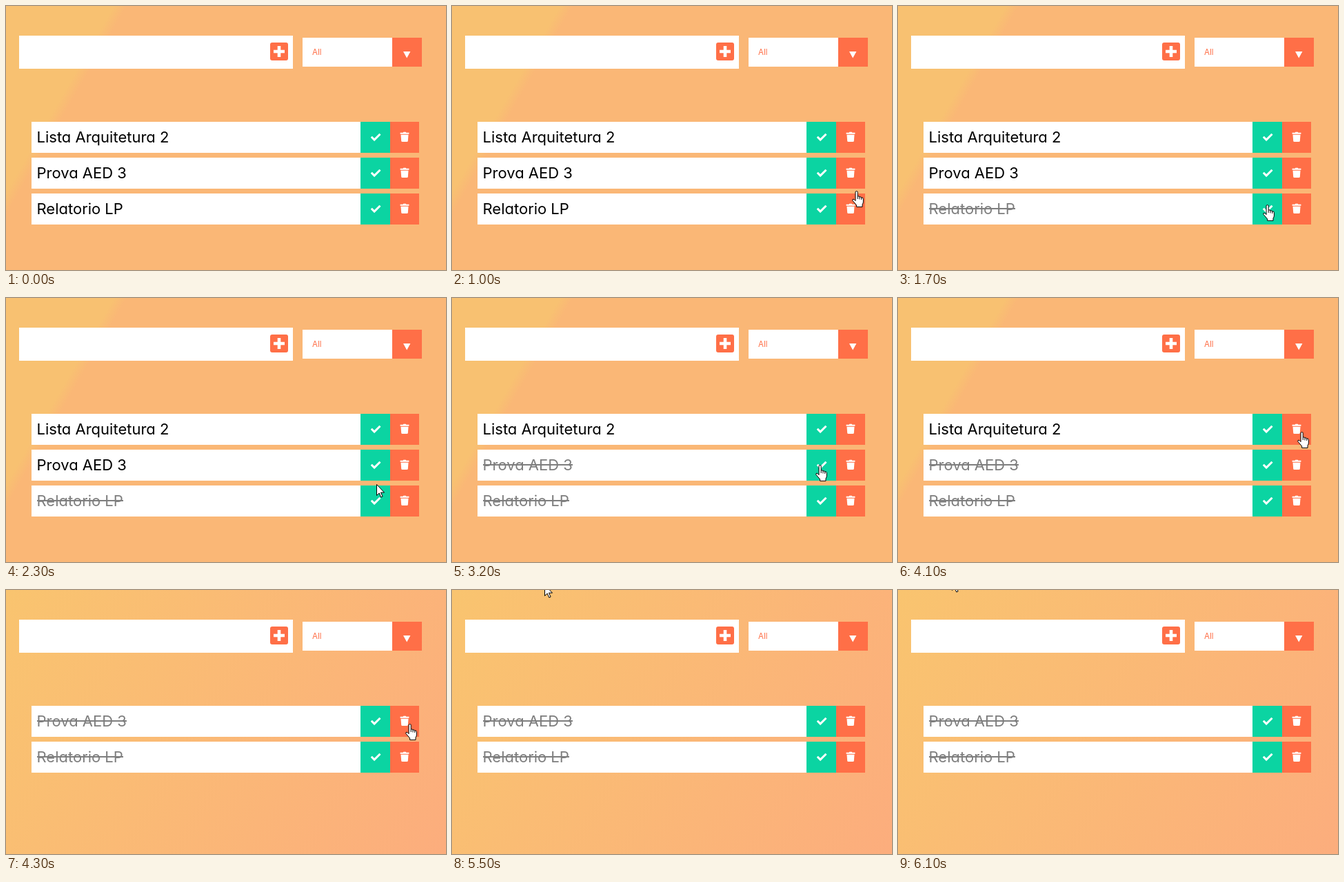
An HTML page for the animation above (6200 ms loop, 638 by 383 pixels).

```html
<!DOCTYPE html>
<html lang="pt">
<head>
<meta charset="utf-8">
<title>Lista de tarefas</title>
<style>
  html, body { margin: 0; width: 100%; height: 100%; overflow: hidden; }
  #stage {
    position: relative; width: 638px; height: 383px; overflow: hidden;
    background: linear-gradient(120deg, #f8c171 18.2%, #fab776 20.4%);
    font-family: Inter, Roboto, sans-serif;
    font-feature-settings: "cv11";
  }
  #stage.smooth { background: linear-gradient(120deg, #f9c46f, #fcad7d); }
  svg { position: absolute; left: 0; top: 0; }
  .input, .select, .row { position: absolute; background: #fff; }
  .input { left: 19px; top: 43px; width: 397px; height: 48px; }
  .select {
    left: 430px; top: 46px; width: 159px; height: 42px; padding-left: 14px;
    font-size: 11.5px; line-height: 42px; color: #ff6f47;
  }
  .row {
    left: 37px; width: 554.5px; height: 45px; padding-left: 7.5px;
    font-size: 22px; line-height: 44px; color: #000; white-space: nowrap;
  }
  .row span { position: relative; display: inline-block; }
  .done span { opacity: .5; }
  .done span::after {
    content: ""; position: absolute; left: 0; right: 0; top: 21px;
    height: 2px; background: #000;
  }
</style>
</head>
<body>
<div id="stage">
  <div class="input"></div>
  <div class="select">All</div>
  <svg width="638" height="383">
    <rect x="383" y="53" width="26" height="26" rx="3" fill="#ff6f47"/>
    <path d="M388 66h16M396 58v16" stroke="#fff" stroke-width="4.6"/>
    <path d="M560 46h43v42h-43z" fill="#ff6f47"/>
    <path d="M576 66h10.4l-5.2 9.4z" fill="#fff"/>
  </svg>
  <div class="row"><span>Lista Arquitetura 2</span></div>
  <div class="row"><span>Prova AED 3</span></div>
  <div class="row"><span>Relatorio LP</span></div>
  <svg width="638" height="383">
    <path id="cursor" fill="#fff" stroke="#000" stroke-linejoin="round"/>
  </svg>
</div>
<script>
const LOOP = 6200, STEP = 100;
const DELETED = 4300, DONE_AT = [Infinity, 3200, 1700];

const BUTTONS = `<svg style="left:477px" width="85" height="45">
  <path d="M0 0h43v45H0z" fill="#0bd4a2"/>
  <path d="M43 0h42v45H43z" fill="#ff6f47"/>
  <path d="M15.8 21.8l4.3 4.3 8.4-8.4" fill="none" stroke="#fff" stroke-width="3"/>
  <path d="M34.6 15.6h4l.8-1h3.2l.8 1h4v2h-12.8zM35.5 18.6h11l-.7 9q-.1 1.2-1.4 1.2h-6.8q-1.3 0-1.4-1.2z"
    transform="translate(0 .2)" fill="#fff"/>
</svg>`.replace('M34.6 15.6h4l.8-1h3.2l.8 1h4v2h-12.8zM35.5', 'M57.6 15.6h4l.8-1h3.2l.8 1h4v2h-12.8zM58.5');

const ARROW = 'M.5.5V16.5l3.7-3.5 2.6 6 2.3-1-2.6-5.8h5z';
const HAND = 'M5 14V2.2a1.6 1.6 0 0 1 3.2 0V8q2.6-.6 2.8 1 2.4-.6 2.8 1 2.6-.4 2.6 1.6V16' +
  'q0 2-1.4 4v3.4H6.6V21L1 14.4q-.8-2 1-2.2 1 0 3 2.4zM8.2 8v4M11 9v3.5M13.8 10v3';

// Pointer visits: [time, x, y, shape] of the shape's top left corner
const TRIPS = [
  { end: 4800, keys: [
    [900, 623, 238, ARROW], [1000, 580, 268, HAND], [1100, 552, 286, HAND],
    [1200, 536, 292, HAND], [1300, 529, 288, HAND], [2100, 529, 288, HAND],
    [2200, 530, 280, HAND], [2300, 537, 270, ARROW], [2400, 537, 270, ARROW],
    [2500, 531, 260, HAND], [3000, 527, 242, HAND], [3200, 527, 242, HAND],
    [3300, 552, 238, HAND], [3400, 580, 230, HAND], [3500, 607, 222, ARROW],
    [3600, 607, 222, ARROW], [3700, 609, 215, ARROW], [3900, 592, 200, HAND],
    [4100, 579, 194, HAND]] },
  { end: LOOP, keys: [
    [5500, 134, -8, ARROW], [5600, 94, -8, ARROW], [5700, 94, -8, ARROW],
    [5800, 86, -8, ARROW], [6000, 72, -11, ARROW], [6100, 78, -16, ARROW]] }
];

const stage = document.getElementById('stage');
const cursor = document.getElementById('cursor');
const rows = [...document.querySelectorAll('.row')];
rows.forEach(row => row.insertAdjacentHTML('beforeend', BUTTONS));

function drawCursor(t) {
  const trip = TRIPS.find(({ end, keys }) => t >= keys[0][0] && t < end);
  cursor.style.display = trip ? '' : 'none';
  if (!trip) return;
  const i = trip.keys.findLastIndex(key => key[0] <= t);
  const [t0, x0, y0, shape] = trip.keys[i];
  const [t1, x1, y1] = trip.keys[i + 1] || [t0 + 1, x0, y0];
  const k = (t - t0) / (t1 - t0);
  const x = Math.round(x0 + (x1 - x0) * k), y = Math.round(y0 + (y1 - y0) * k);
  cursor.setAttribute('d', shape);
  cursor.setAttribute('transform', `translate(${x} ${y})`);
}

function draw(now) {
  const t = Math.floor(now % LOOP / STEP) * STEP;
  const deleted = t >= DELETED;
  stage.classList.toggle('smooth', deleted);
  rows.forEach((row, i) => {
    row.classList.toggle('done', t >= DONE_AT[i]);
    row.style.top = 168 + 52 * (i - deleted) + 'px';
    row.style.display = deleted && i === 0 ? 'none' : '';
  });
  drawCursor(t);
}

const start = performance.now();
function tick() {
  draw(performance.now() - start);
  requestAnimationFrame(tick);
}
tick();
</script>
</body>
</html>
```
